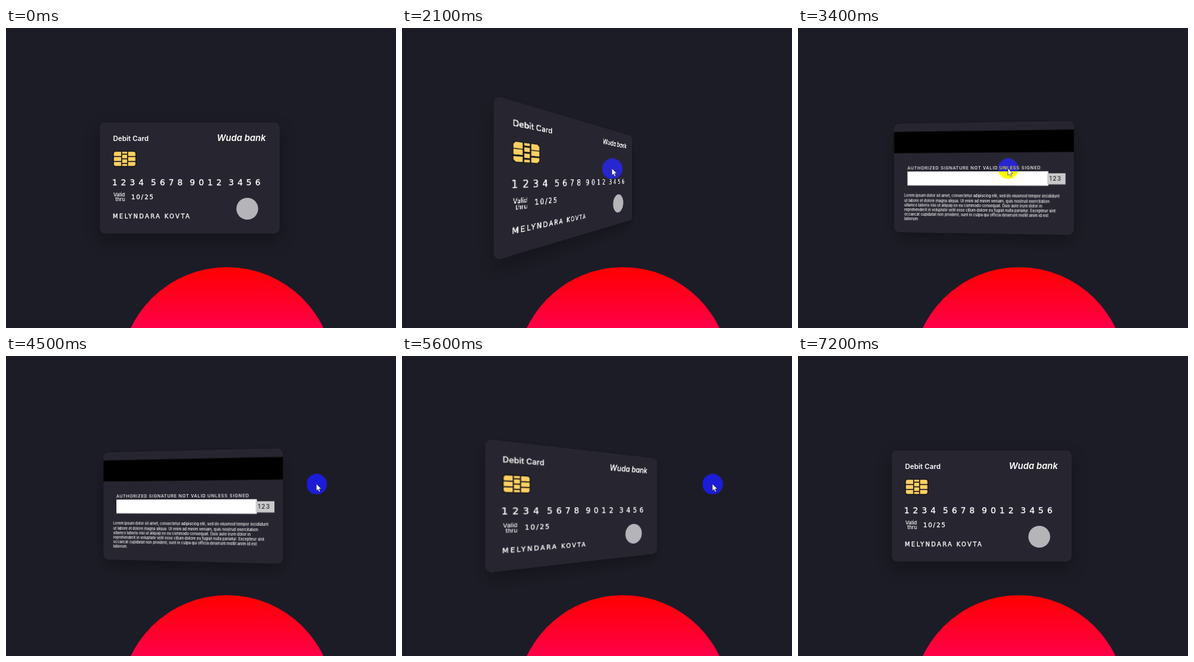
These frames come from a looping animation (590 px wide and 454 px high, 7700 ms). An HTML page:

```html
<!DOCTYPE html>
<html lang="en">
<head>
<meta charset="utf-8">
<title>Flipping debit card</title>
<style>
  html, body { margin: 0; width: 100%; height: 100%; overflow: hidden; background: #1c1c26; }
  #stage {
    position: relative; width: 590px; height: 454px; overflow: hidden;
    isolation: isolate; background: #1c1c26;
  }
  #sun {
    position: absolute; left: 173px; top: 361.7px; width: 323px; height: 323px;
    border-radius: 50%; background: linear-gradient(#f00, #f0f);
  }
  #scene { position: absolute; left: 142px; top: 143px; width: 272px; height: 168px; perspective: 300px; }
  #card { width: 100%; height: 100%; transform-style: preserve-3d; }
  .face {
    position: absolute; inset: 0; overflow: hidden; border-radius: 8px;
    background: #272630; box-shadow: 0 10px 25px rgba(0, 0, 0, .3);
    backface-visibility: hidden;
  }
  .back { transform: rotateY(180deg); }
  .face svg { display: block; }
  text { fill: #fff; font-family: Inter, sans-serif; font-weight: 500; white-space: pre; }
  .title { font-weight: 600; }
  .wide { font-family: "DejaVu Sans", sans-serif; font-weight: 400; stroke: #fff; stroke-width: .3px; }
  #disc, #arrow { position: absolute; left: 0; top: 0; }
  #disc {
    width: 31px; height: 31px; margin: -15.5px; border-radius: 50%;
    background: #00f; mix-blend-mode: difference;
  }
</style>
</head>
<body>
<div id="stage">
  <div id="sun"></div>
  <div id="scene">
    <div id="card">
      <div class="face">
        <svg width="272" height="168">
          <text class="title" x="20" y="27.5" font-size="10.5">Debit Card</text>
          <text class="title" x="251" y="27.5" font-size="13.3" font-style="italic" text-anchor="end">Wuda bank</text>
          <g transform="translate(20 43)" stroke="#15151b" stroke-width="1.5">
            <rect x=".5" y=".5" width="34" height="23" rx="3.5" fill="#ffd060"/>
            <path fill="none" d="M13 0V24M22 0V24M0 8.5H13M0 16H13M22 8.5H35M22 16H35M13 5H22M13 12H22M13 19H22"/>
          </g>
          <text class="wide" x="18.5" y="95" font-size="12.5" letter-spacing="5.4" word-spacing="-4">1234 5678 9012 3456</text>
          <text x="38" y="112" font-size="7.5" font-weight="400" text-anchor="end">Valid</text>
          <text x="38" y="119" font-size="7.5" font-weight="400" text-anchor="end">thru</text>
          <text class="wide" x="47.5" y="116" font-size="9.2" letter-spacing="1.7">10/25</text>
          <text class="wide" x="19.5" y="145" font-size="9" letter-spacing="2.1">MELYNDARA KOVTA</text>
          <circle cx="223" cy="130.5" r="16.5" fill="#b4b4b9"/>
        </svg>
      </div>
      <div class="face back">
        <svg width="272" height="168">
          <rect y="12.5" width="272" height="33"/>
          <text x="21" y="71.5" font-size="6.5" letter-spacing=".75">AUTHORIZED SIGNATURE NOT VALID UNLESS SIGNED</text>
          <rect x="21" y="74" width="214" height="21.5" fill="#fff"/>
          <rect x="233.5" y="77" width="26.5" height="16.5" fill="#c9c9cb"/>
          <text x="236.5" y="88.5" font-size="8.5" letter-spacing="1.4" style="fill:#222">123</text>
          <g id="terms" font-size="5.5"></g>
        </svg>
      </div>
    </div>
  </div>
  <div id="disc"></div>
  <svg id="arrow" width="10" height="14" viewBox="-1 -1 10 14" style="margin:-1px">
    <path d="M0 0V10.5L2.4 8.3L4 12L5.8 11.2L4.2 7.6H7.5Z" fill="#fff" stroke="#222" stroke-width=".6"/>
  </svg>
</div>
<script>
const LOOP = 7700, STEP = 100, FLIP = 2020;
const FLIP_OVER = 1728, FLIP_BACK = 4412;
const byId = id => document.getElementById(id);
const card = byId('card'), pointer = [byId('disc'), byId('arrow')];

// Pointer stops: time, x, y
const stops = [
  [1550, 620, 300], [1600, 497, 268], [1700, 405, 240], [1900, 317.5, 212.5],
  [3700, 317.5, 212.5], [3900, 466, 197], [4100, 472, 193.5], [4400, 469.5, 193.5],
  [6750, 469.5, 193.5], [7200, 430, 490]
];

byId('terms').innerHTML = [
  'Lorem ipsum dolor sit amet, consectetur adipiscing elit, sed do eiusmod tempor incididunt',
  'ut labore et dolore magna aliqua. Ut enim ad minim veniam, quis nostrud exercitation',
  'ullamco laboris nisi ut aliquip ex ea commodo consequat. Duis aute irure dolor in',
  'reprehenderit in voluptate velit esse cillum dolore eu fugiat nulla pariatur. Excepteur sint',
  'occaecat cupidatat non proident, sunt in culpa qui officia deserunt mollit anim id est',
  'laborum.'
].map((line, i) => `<text x="16" y="${113.5 + i * 7.2}">${line}</text>`).join('');

// cubic-bezier(.25, .1, .25, 1)
function ease(x) {
  if (x <= 0) return 0;
  if (x >= 1) return 1;
  let low = 0, high = 1, u;
  for (let i = 0; i < 30; i++) {
    u = (low + high) / 2;
    if (.75 * u * (1 - u) + u ** 3 < x) low = u; else high = u;
  }
  return .3 * u * (1 - u) ** 2 + 3 * u * u * (1 - u) + u ** 3;
}

function pointerAt(t) {
  const next = stops.findIndex(stop => stop[0] > t);
  if (next < 1) return null;
  const [t0, x0, y0] = stops[next - 1], [t1, x1, y1] = stops[next];
  const k = (t - t0) / (t1 - t0);
  return [x0 + (x1 - x0) * k, y0 + (y1 - y0) * k];
}

function draw(now) {
  const t = Math.floor(now % LOOP / STEP) * STEP;
  const angle = 180 * (ease((t - FLIP_OVER) / FLIP) - ease((t - FLIP_BACK) / FLIP));
  card.style.transform = `rotateY(${angle}deg)`;
  const spot = pointerAt(t);
  for (const part of pointer) {
    part.style.display = spot ? 'block' : 'none';
    if (spot) part.style.transform = `translate(${spot[0]}px, ${spot[1]}px)`;
  }
}

const start = performance.now();
function tick() {
  draw(performance.now() - start);
  requestAnimationFrame(tick);
}
tick();
</script>
</body>
</html>
```
